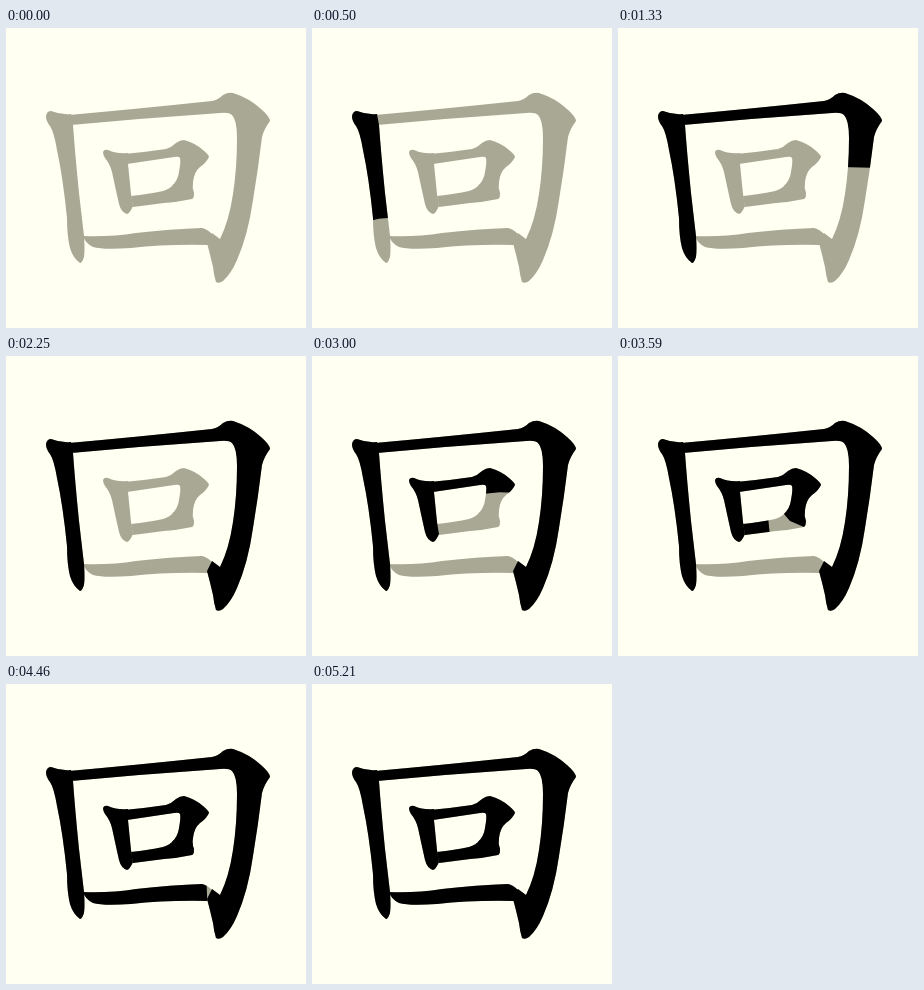
An HTML page for the animation above (5290 ms loop, 300 by 300 pixels).

```html
<!DOCTYPE html>
<html lang="en">
<head>
<meta charset="utf-8">
<title>Stroke order</title>
<style>
  html, body { margin: 0; width: 100%; height: 100%; overflow: hidden; background: #fffff2; }
  svg { display: block; width: 100vw; height: 100vh; }
</style>
</head>
<body>
<svg id="stage" viewBox="0 0 300 300"></svg>
<script>
const LOOP = 5290;
const INK = '#000';
const GHOST = '#a8a894';

// outline: brush shape; spine: path of the brush; keys: [time in ms, share of the spine drawn]
const strokes = [
  {
    outline: 'M40 88Q41 83 45 83Q55 87 65 86L67 97Q69 125 73 165L78 208Q79 222 78 229Q76 235 74 235Q67 230 64 220Q61 208 61 190Q57 150 51 122Q48 104 44 98Q40 93 40 88Z',
    spine: 'M44 82L70 190L74 238', width: 50,
    keys: [[40, .06], [500, .7], [579, .7], [580, .75], [790, 1]]
  },
  {
    outline: 'M63 87Q130 81 206 73Q212 72 217 67Q222 64 227 65Q243 70 255 81Q264 89 264 93Q258 101 256 109Q252 142 247 172Q242 207 231 232Q225 246 217 253Q213 256 210 254Q208 248 207 239Q204 226 201 215L206 205L214 211Q223 193 227 166Q231 140 231 110Q231 92 226 87Q223 84 214 85Q140 90 65 97Z',
    spine: 'M62 92L225 79Q243 78 242 100L241 140L221 264', width: 60,
    keys: [[960, .04], [1330, .65], [1419, .65], [1420, .69], [1920, 1]]
  },
  {
    outline: 'M97 124Q98 121 102 122Q111 126 122 125L122 136L125 166L127 178Q124 185 121 186Q115 184 113 176Q109 158 106 144Q104 136 99 130Q97 127 97 124Z',
    spine: 'M108 116L121 190', width: 44,
    keys: [[2289, 0], [2290, .1], [2750, 1]]
  },
  {
    outline: 'M118 126Q140 124 160 121Q166 119 170 115Q174 112 178 112Q189 115 197 122Q203 127 203 129Q200 135 194 139Q188 144 187 154Q186 160 188 165Q188 169 186 171L172 165L166 158Q172 152 173 144Q175 133 174 130Q173 128 168 129L121 136Z',
    spine: 'M110 122L188 114L186 175', width: 44,
    keys: [[2750, 0], [2790, .12], [3000, .72], [3210, 1]]
  },
  {
    outline: 'M125 168Q143 166 157 163Q164 161 168 156L187 163Q189 169 186 171Q172 174 158 175L127 179Z',
    spine: 'M120 172L192 165', width: 46,
    keys: [[3499, 0], [3500, .18], [3800, 1]]
  },
  {
    outline: 'M77 208Q105 209 130 205Q165 201 196 200Q201 201 206 206L210 212L203 217Q160 216 125 220Q97 222 87 219Q79 215 77 208Z',
    spine: 'M76 212L212 208', width: 46,
    keys: [[3999, 0], [4000, .09], [4090, .23], [4169, .23], [4170, .31], [4500, 1]]
  }
];

const stage = document.getElementById('stage');

function add(parent, tag, attributes) {
  const node = document.createElementNS('http://www.w3.org/2000/svg', tag);
  for (const name in attributes) node.setAttribute(name, attributes[name]);
  return parent.appendChild(node);
}

function progress(keys, t) {
  if (t < keys[0][0]) return 0;
  for (let i = 1; i < keys.length; i++) {
    const [t0, a] = keys[i - 1], [t1, b] = keys[i];
    if (t < t1) return a + (b - a) * (t - t0) / (t1 - t0);
  }
  return 1;
}

for (const { outline } of strokes) add(stage, 'path', { d: outline, fill: GHOST });

strokes.forEach((stroke, i) => {
  const clip = add(stage, 'clipPath', { id: 'brush' + i });
  add(clip, 'path', { d: stroke.outline });
  const layer = add(stage, 'g', { 'clip-path': `url(#brush${i})` });
  stroke.ink = add(layer, 'path', {
    d: stroke.spine, fill: 'none', stroke: INK, 'stroke-width': stroke.width
  });
  stroke.length = stroke.ink.getTotalLength();
});

function draw(t) {
  for (const { ink, keys, length } of strokes) {
    const share = progress(keys, t);
    ink.setAttribute('visibility', share > 0 ? 'visible' : 'hidden');
    ink.setAttribute('stroke-dasharray', share < 1 ? `${share * length} ${length * 2}` : 'none');
  }
}

const start = performance.now();
function tick() {
  draw((performance.now() - start) % LOOP);
  requestAnimationFrame(tick);
}
tick();
</script>
</body>
</html>
```
